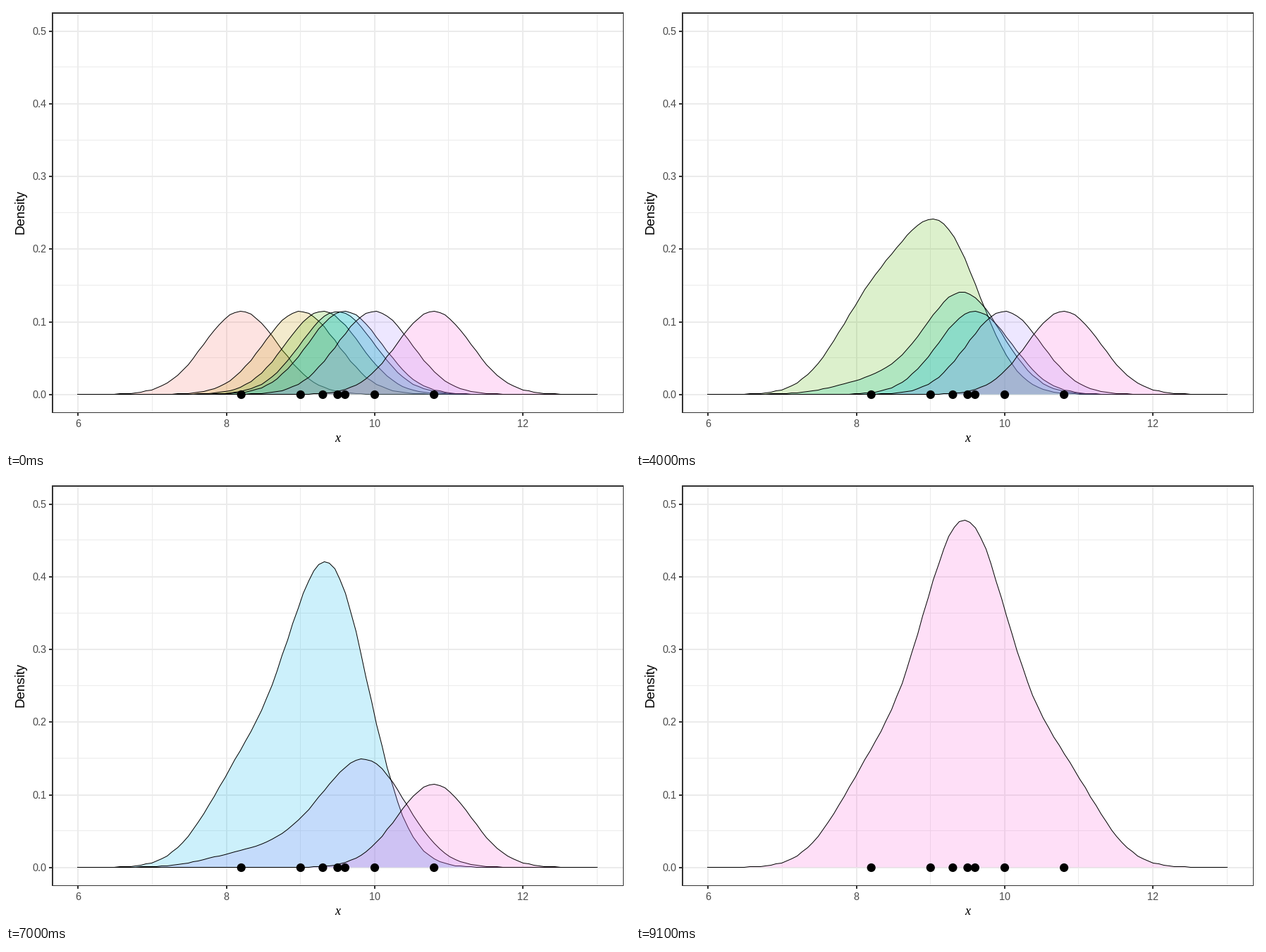
Animation, 885 px wide and 632 px high, one loop 10000 ms. Source, as a matplotlib script:

```python
import numpy as np
import matplotlib.pyplot as plt
from matplotlib.animation import FuncAnimation
from matplotlib.patches import Circle, Polygon, Rectangle

W, H, DPI = 885, 632, 100
PT = 72 / DPI  # points per pixel

LEFT, TOP, RIGHT, BOTTOM = 65, 9, 876, 578
X6, X_UNIT = 101.9, 105.17
Y0, Y_UNIT = 551.4, 1032.4

SAMPLE = [8.2, 9.0, 9.3, 9.5, 9.6, 10.0, 10.8]
COLORS = ["#F8766D", "#C49A00", "#53B400", "#00C094",
          "#00B6EB", "#A58AFF", "#FB61D7"]
BANDWIDTH = 0.5
N = len(SAMPLE)

FRAMES, INTERVAL = 100, 100
STARTS = [9, 25, 40, 55, 70, 85]  # first frame of each merge
STEPS = 7

plt.rcParams["font.family"] = "Liberation Sans"
plt.rcParams["text.hinting"] = "native"
plt.rcParams["text.hinting_factor"] = 1
fig = plt.figure(figsize=(W / DPI, H / DPI), dpi=DPI, facecolor="white")
ax = fig.add_axes([0, 0, 1, 1])
ax.set_xlim(0, W)
ax.set_ylim(H, 0)
ax.axis("off")


def px(x):
    return X6 + (x - 6) * X_UNIT


def py(y):
    return Y0 - y * Y_UNIT


def bar(x, y, w, h, color, z):
    ax.add_patch(Rectangle((x, y), w, h, fc=color, ec="none", lw=0, zorder=z))


def grid_x(value, width, z):
    bar(np.floor(px(value)), TOP, width, BOTTOM - TOP, "#EBEBEB", z)


def grid_y(value, width, z):
    bar(LEFT, np.floor(py(value)), RIGHT - LEFT, width, "#EBEBEB", z)


def label(x, y, text, size, color="black", **kw):
    ax.text(x, y, text, fontsize=size * PT, color=color, va="baseline", **kw)


def draw_axes():
    dark, grey = "#333333", "#4D4D4D"
    for v in (7, 9, 11, 13):
        grid_x(v, 1, 1)
    for v in np.arange(0.05, 0.5, 0.1):
        grid_y(v, 1, 1)
    for v in (6, 8, 10, 12):
        grid_x(v, 2, 2)
        bar(np.floor(px(v)), BOTTOM, 2, 4, dark, 30)
        label(px(v), 598, str(v), 15, grey, ha="center")
    for v in np.arange(6) / 10:
        grid_y(v, 2, 2)
        bar(LEFT - 4, np.floor(py(v)), 4, 2, dark, 30)
        label(57, py(v) + 5.4, f"{v:.1f}", 15, grey, ha="right")

    # the panel clips the outer half of the right and bottom borders
    bar(LEFT, TOP, 2, BOTTOM - TOP, dark, 30)
    bar(LEFT, TOP, RIGHT - LEFT, 2, dark, 30)
    bar(RIGHT - 1, TOP, 1, BOTTOM - TOP, dark, 30)
    bar(LEFT, BOTTOM - 1, RIGHT - LEFT, 1, dark, 30)

    label(25, 293, "Density", 19, ha="center", rotation=90,
          rotation_mode="anchor")
    label(470, 619, "x", 19, ha="center", family="Liberation Serif",
          style="italic")


draw_axes()

grid = np.linspace(6, 13, 100)
z = (grid - np.array(SAMPLE)[:, None]) / BANDWIDTH
kernels = np.exp(-z ** 2 / 2) / (N * BANDWIDTH * np.sqrt(2 * np.pi))
totals = np.cumsum(kernels, axis=0)

areas, lines = [], []
for k, color in enumerate(COLORS):
    area = Polygon([(0, 0)] * 3, fc=color, ec="none", lw=0, alpha=0.2,
                   zorder=10 + k)
    areas.append(ax.add_patch(area))
    lines += ax.plot([], [], color="black", lw=PT, solid_joinstyle="round",
                     zorder=10.5 + k)

for value in SAMPLE:
    ax.add_patch(Circle((px(value) + 0.4, 552), 6.1, fc="black", ec="none",
                        lw=0, zorder=25))


def progress(k, i):
    """Share of the earlier kernels already stacked on curve k."""
    if k == 0:
        return 0.0
    return min(max((i - STARTS[k - 1] + 1) / STEPS, 0.0), 1.0)


def update(i):
    # vertices sit on whole pixels
    xs = np.floor(px(grid)) + 0.5
    base_y = np.floor(Y0) + 0.5
    for k in range(N):
        # a curve vanishes once the next one has absorbed it
        shown = k == N - 1 or progress(k + 1, i) < 1
        density = kernels[k].copy()
        if k:
            density += progress(k, i) * totals[k - 1]
        ys = np.floor(py(density)) + 0.5
        outline = np.column_stack([xs, ys])
        base = [(xs[-1], base_y), (xs[0], base_y)]
        areas[k].set_xy(np.vstack([outline, base]))
        lines[k].set_data(xs, ys)
        areas[k].set_visible(shown)
        lines[k].set_visible(shown)
    return areas + lines


anim = FuncAnimation(fig, update, frames=FRAMES, interval=INTERVAL,
                     init_func=lambda: update(0), repeat=True,
                     repeat_delay=0, blit=False)
plt.show()
```
